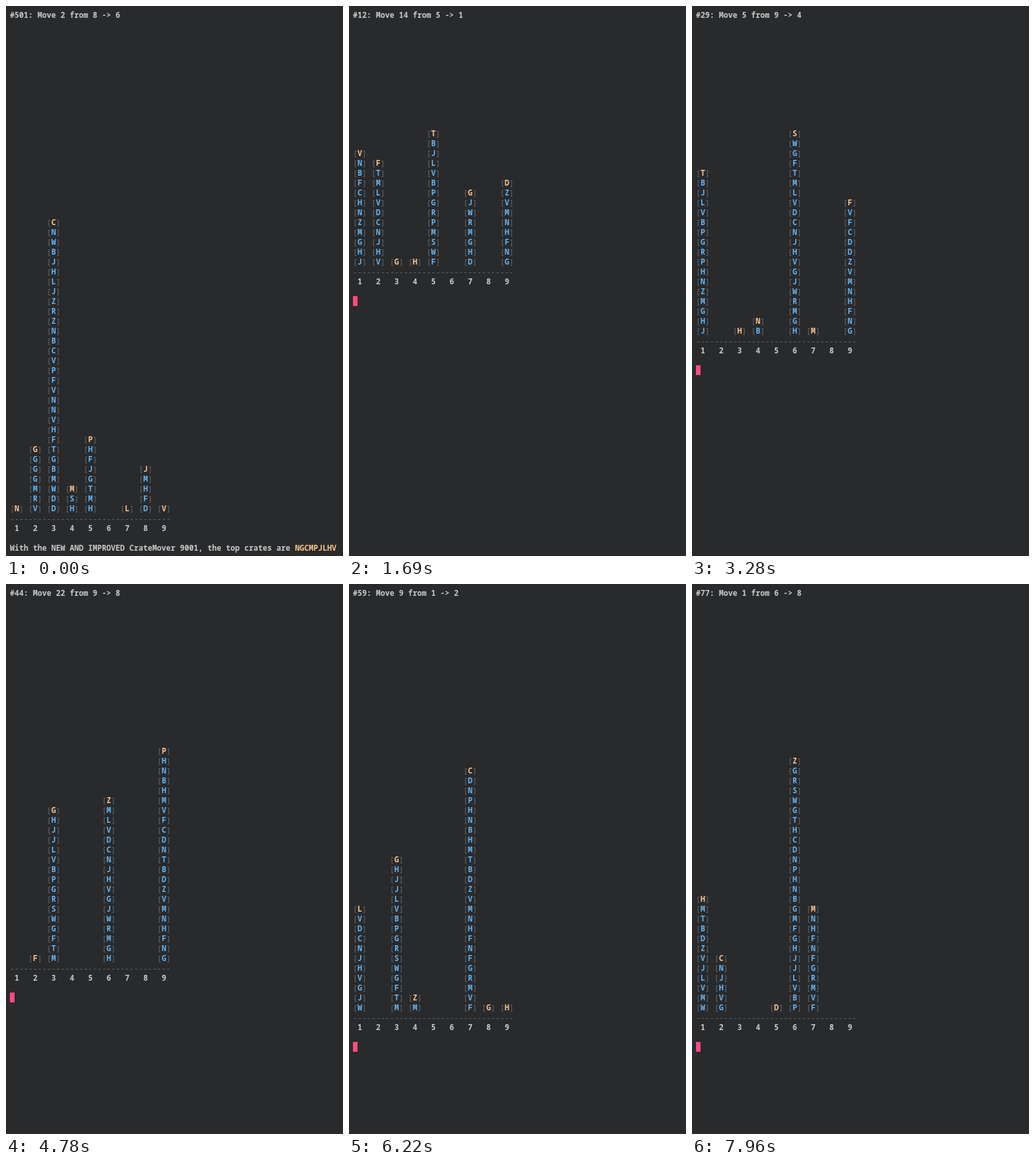
Animation of 513x836 px, one loop 8000 ms. Source, as an HTML page with a canvas:

```html
<!DOCTYPE html>
<html lang="en">
<head>
<meta charset="utf-8">
<title>Crate stacks</title>
<style>
  html, body { margin: 0; width: 100%; height: 100%; overflow: hidden; background: #292a2c; }
  canvas { display: block; width: 513px; height: 836px; }
</style>
</head>
<body>
<canvas id="stage"></canvas>
<script>
const W = 513, H = 836, LOOP = 8000;
const LEFT = 6, TOP = 6, CELL = 7, LINE = 15, GAP = 4, TICK = 60;
const COLOR = {
  back: '#292a2c', text: '#c8c9c9', dim: '#686868',
  crate: '#62b4f5', top: '#fdc58c', cursor: '#ff4a80'
};
const FONT = '11.667px "Noto Sans Mono", "DejaVu Sans Mono", monospace';
const NAMES = 'abcdefghi';

// Stacks are written from the floor up.
const START = 'JHGMZJ VHJ GVLMG HVZDVNCD FWSMPR NHCFBN DHGMRW BVLJBTTF GNFHNMGP';
const END = 'N,VRMGGGG,DDWMBGTFHVNNVFPVCBNZRZJLHJBWNC,HSM,HMTGJFHP,,L,DFHMJ,V';

// Each run: start time, then moves as count, source stack, target stack.
const RUNS = [
  [500, '1ca 2ie 3db 2hc 1df 2ag 3di 5cb 6he 7fe 7ea'],
  [1690, '14ea'],
  [1750, '7gf 1gi 11bf 1cb 10af 1dc 1ag 2ae 1ah 3ad 2ai 1di 1hi 10fa 1bf 2ef'],
  [3280, '5id'],
  [3400, '5fg 17af 2fi 7fg 1db 5di 3fd 1fa 1fi 1ci 4di 3fg 1af 16gc'],
  [4780, '22ih'],
  [4840, '1bc 13fa 2fe 6hg 5hd 1fe 6gh 5dh'],
  [5620, '21hc'],
  [5740, '2cg 3eg 1fi 20cg 2ad 9ab 1ae 2da 8cf 1ig 5cd 2cd 1cd'],
  [7000, '1hd'],
  [7120, '3df 8gf 1df 1ad 6df 2ba 1ea 7ga 1be'],
  [7960, '1fh']
];

const title = (step, n, from, to) => `#${step}: Move ${n} from ${from + 1} -> ${to + 1}`;

function buildScenes() {
  const scenes = [{ at: 0, title: title(501, 2, 7, 5), stacks: END.split(','), rows: 46 + GAP, done: true }];
  let stacks = START.split(' ');
  let tallest = 0;
  RUNS.forEach(([at, list], r) => {
    const until = r + 1 < RUNS.length ? RUNS[r + 1][0] : LOOP;
    const moves = list.split(' ');
    moves.forEach((move, i) => {
      const [, count, a, b] = move.match(/(\d+)(\w)(\w)/);
      const n = +count, from = NAMES.indexOf(a), to = NAMES.indexOf(b);
      tallest = Math.max(tallest, ...stacks.map(s => s.length));
      const ticks = Math.round((until - at) * i / moves.length / TICK);
      scenes.push({
        at: at + ticks * TICK,
        title: title(scenes.length, n, from, to),
        stacks, rows: tallest + GAP
      });
      stacks = stacks.slice();
      const cut = stacks[from].length - n;
      stacks[to] += stacks[from].slice(cut);
      stacks[from] = stacks[from].slice(0, cut);
    });
  });
  return scenes;
}

const scenes = buildScenes();
const canvas = document.getElementById('stage');
const ctx = canvas.getContext('2d');
const ratio = window.devicePixelRatio || 1;
canvas.width = W * ratio;
canvas.height = H * ratio;
ctx.scale(ratio, ratio);

function write(text, col, row, color, bold = true) {
  ctx.font = (bold ? 'bold ' : '') + FONT;
  ctx.fillStyle = color;
  ctx.fillText(text, LEFT + col * CELL, TOP + row * LINE + 12);
}

function draw(scene) {
  ctx.fillStyle = COLOR.back;
  ctx.fillRect(0, 0, W, H);
  write(scene.title, 0, 0, COLOR.text);

  scene.stacks.forEach((stack, s) => {
    const col = s * 4;
    [...stack].forEach((letter, k) => {
      const row = scene.rows - k;
      write('[', col, row, COLOR.dim, false);
      write(letter, col + 1, row, k === stack.length - 1 ? COLOR.top : COLOR.crate);
      write(']', col + 2, row, COLOR.dim, false);
    });
    write(String(s + 1), col + 1, scene.rows + 2, COLOR.text);
  });
  write('-'.repeat(35), 0, scene.rows + 1, COLOR.dim, false);

  const last = scene.rows + 4;
  if (scene.done) {
    const label = 'With the NEW AND IMPROVED CrateMover 9001, the top crates are ';
    write(label, 0, last, COLOR.text);
    write('NGCMPJLHV', label.length, last, COLOR.top);
  } else {
    ctx.fillStyle = COLOR.cursor;
    ctx.fillRect(LEFT, TOP + last * LINE, CELL, LINE);
  }
}

const origin = performance.now();
function frame() {
  const t = (performance.now() - origin) % LOOP;
  let i = scenes.length - 1;
  while (scenes[i].at > t) i--;
  draw(scenes[i]);
  requestAnimationFrame(frame);
}
frame();
</script>
</body>
</html>
```
